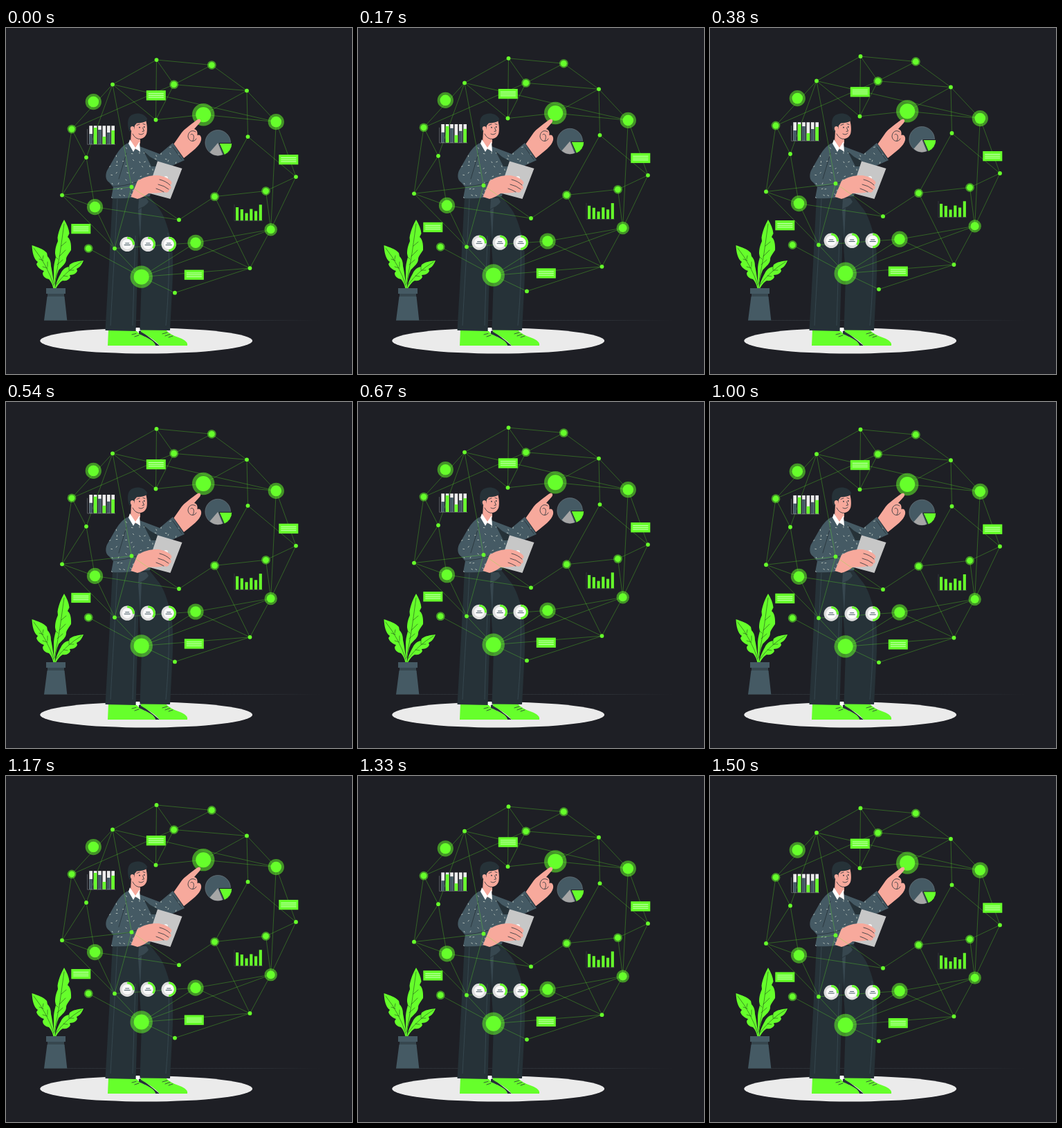
Write an HTML page that moves like this. It is 500 by 500 pixels and loops after 1540 ms.

```html
<!DOCTYPE html>
<html lang="en">
<head>
<meta charset="utf-8">
<title>Data network</title>
<style>
html, body { margin: 0; width: 100%; height: 100%; overflow: hidden; background: #1e1f25; }
svg { display: block; width: 100vw; height: 100vh; }
.g { fill: #66ff2b; }
.slate { fill: #455a64; }
.dark { fill: #263238; }
.skin { fill: #f7a99c; }
.ink { fill: none; stroke: #263238; stroke-width: .8; stroke-linecap: round; stroke-linejoin: round; }
.vein { fill: none; stroke: #1f4a1c; stroke-width: .6; stroke-linecap: round; }
.seam { fill: none; stroke: #41545d; stroke-width: .6; }
.link { fill: none; stroke: #66ff2b; stroke-width: .6; opacity: .5; }
.ring { fill: #66ff2b; opacity: .52; }
.rows { fill: none; stroke: #d9ffca; stroke-width: .9; }
</style>
</head>
<body>
<svg viewBox="0 0 500 500">
  <defs>
    <linearGradient id="fade"><stop stop-color="#30353b"/><stop offset=".75" stop-color="#30353b"/><stop offset="1" stop-color="#1e1f25"/></linearGradient>
    <clipPath id="cut"><use href="#shirt"/></clipPath>
  </defs>

  <rect x="55" y="422" width="400" height=".8" fill="url(#fade)"/>
  <ellipse cx="202.700" cy="452" rx="153.500" ry="18.500" fill="#ebebeb"/>

  <g id="plant">
    <path class="g" d="M84 277C88 284 91 290 91.500 297L89 302C93 305 94.500 312 94 321C91 326 87 330 87 334C87 341 80 345 76 350C73 357 71 366 70.800 376H69.300C69 366 69 358 69 350C69 341 71 336 72 331L71 326C71 318 73 313 75 308L74.500 303C76 293 80 284 84 277Z"/>
    <path class="g" d="M37.500 314C46 317 54 319 59 325L60 330C64 334 65 339 65 344C67 353 69 366 69.700 376H68.300C67 370 65 366 62 363C57 362 53 359 53 354L55 351C49 349 45 345 44 341L46 338C40 334 38 324 37.500 314Z"/>
    <path class="g" d="M112 336C104 337 97 338 92 342L91 345C85 346 81 350 79 355C75 362 72 369 71 376H72.300C75 371 78 367 82 365C87 366 91 364 93 360L92 357C98 357 102 354 103 351L102 348C107 346 110 341 112 336Z"/>
    <path class="vein" d="M84 283Q79 325 70.200 370M40 318Q60 343 69 372M109 338Q86 352 72.500 371M80 315L87 309M77 330L86 321M74 342L82 335M75 334L72 331M53 334L54 329M60 345L60 338M54 336L48 334M60 347L53 345M91 349L91 345M91 350L98 350M83 358L89 359"/>
    <path fill="#37474f" d="M60 383H84V389H60Z"/>
    <path class="slate" d="M58 376H86V384H58ZM59.500 388H84.500L88.300 422.500H55Z"/>
  </g>

  <g id="man">
    <path class="g" d="M148 436H188C190 442 200 446 210 450C215 452 217 455 215.500 459H147Z"/>
    <path class="dark" d="M192 437L196 438L222 459H216C215 451 202 447 192 442Z"/>
    <path class="g" d="M195 436H231C235 442 246 446 254 449C260 452 263 455 262 459H222C216 451 203 444 195 439Z"/>
    <path class="ink" d="M182 443L188 441.500M186 446L192 444M226 442L233 440M230 445L237 442.500M235 447L241 445"/>
    <path fill="#fff" d="M187.500 433H193V438H187.500Z"/>
    <path class="dark" d="M154 243H194L191 320L187.500 438L143.500 437L149 340ZM190 243H207L222 262C229 272 233 286 237 300C242 318 242 345 240 380L237 437L193.500 436.500L196 360L192 300Z"/>
    <path fill="#37474f" d="M191 262C196 259 203 257 206 251L203 246H192ZM191 263L196 260L194 305Z"/>
    <path class="seam" d="M161 247C158 310 154 370 151 430M234 296C237 330 235 385 231 430M187 300L183 430"/>
    <path id="shirt" class="slate" d="M179 165C169 169 165 174 158 185L146 206C143 213 144 220 149 223L155 230L152 246Q167 247 182 245L208 243L216 206L238 200L258 191L241 166L222 182L193 171Z"/>
    <g id="dashes" clip-path="url(#cut)" fill="none" stroke="#cfd8cf" stroke-width=".8"></g>
    <path class="dark" d="M199 178L208 186L222 194L219 200L210 200Z"/>
    <path class="ink" d="M174 181Q167 205 163 218M154 229Q170 229 188 223M241 172L254 190"/>
    <path class="skin" d="M181 148H194L194 166L188 176L180 166Z"/>
    <path fill="#fff" d="M179 161L187 173L193 164L194 179L187 174L184 179L177 167Z"/>
    <path class="skin" d="M182 136L202 133C204 140 204.500 148 203 153C201 158 197 160.500 192 160C188 159 184 154 182 149Z"/>
    <path class="dark" d="M178 149C175 140 175 130 181 126C188 121.500 200 123 204 131C204 135 200 137 189 137.500L186 141L185 147L182 143L181 150Z"/>
    <path class="skin" d="M185 143C181 140 178 144 181 148.500L185 150Z"/>
    <path class="ink" d="M183 153Q187 161 194 160.500M189 140.500L193 139M198 138.500L201 139.500M197.500 144L199.500 149L197 149.500M192 153Q196 155.500 199 152"/>
    <circle cx="193" cy="143.700" r=".9" class="dark"/><circle cx="199.700" cy="143" r=".9" class="dark"/>
    <path fill="#c7c7c7" d="M219 192.500L254.500 203L237.500 247L204 238Z"/>
    <circle cx="231" cy="217" r="3" fill="#f5f5f5"/>
    <path class="skin" d="M180.500 244L190 221C199 215 210 212.500 220 213C228 214 235 217 239 222C240 224 239 226 237 227C240 230 239 233 236 233.500C236 237 232 239 229 237C221 239 213 238 206 239Q198 245 190 247Z"/>
    <path class="ink" d="M222 219Q231 221 237 227M220 226Q229 228 235 233M217 232Q223 234 228 237"/>
  </g>

  <g id="net"></g>

  <path class="skin" d="M242.500 167.500L254 151C258 146 263 143 267 139.500L276 132.700C280 130 283 133 280 137L272 146C276 147 277 150 276.500 155C280 153 283 157 282 162C280 171 269 178 257 188Z"/>
  <path class="ink" d="M274 150C268 146 263 151 263 157C264 164 272 166 275 160M267 154C271 151 273 158 270 163"/>
</svg>
<script>
const $ = id => document.getElementById(id);
const circle = (x, y, r, more) => `<circle cx="${x}" cy="${y}" r="${r}" ${more}/>`;
const rect = (x, y, w, h, more) => `<rect x="${x}" y="${y}" width="${w}" height="${h}" ${more}/>`;
const green = 'class="g"';

// x, y and size class of each node
const nodes = {
  A: [217.5, 46, 0], B: [154, 81.5, 0], C: [348, 90.5, 0], D: [216.5, 132.7, 0],
  E: [349.5, 157, 0], F: [116, 187, 0], G: [81, 241.5, 0], H: [181.5, 229.7, 0],
  I: [250, 277.2, 0], J: [157, 318.5, 0], K: [352.5, 347, 0], L: [244, 382.6, 0], M: [419, 215, 0],
  N: [297.3, 53.5, 1], O: [242.7, 81.6, 1], P: [95, 146, 1], Q: [301.5, 243.6, 1],
  R: [375.5, 235.5, 1], S: [119.2, 318.5, 1],
  T: [126.3, 106.6, 3], U: [390.3, 135.6, 3], V: [128.5, 258.6, 3], W: [274, 310.2, 3], X: [382.7, 291.2, 2],
  Y: [285.2, 125.2, 4], Z: [195.7, 359.6, 4]
};
const sizes = [[2.9, 0], [4.4, 6.4], [6, 9.2], [7.8, 11.6], [11, 16.2]];
const links = 'AB AN AD AO NC NO OC OD BD BP BF BH BU PO YD YC YU CE CU EM UM UX EQ QR RX RM XM ' +
  'QI QK XK XW XZ WZ WK ZK ZL LK VI IH HJ GJ GH GV GF GP PF FV VJ SZ JZ JW';

const at = k => nodes[k].slice(0, 2).join(' ');
const web = `<path class="link" d="${links.split(' ').map(([a, b]) => `M${at(a)}L${at(b)}`).join('')}"/>`;
const dots = Object.values(nodes).map(([x, y, s]) => {
  const [r, halo] = sizes[s];
  return (halo ? circle(x, y, halo, 'class="ring"') : '') + circle(x, y, r, green);
}).join('');

const tag = (x, y) => rect(x, y, 28, 14.3, green) +
  `<path class="rows" d="M${x + 3} ${y + 4.5}h22m-22 2.7h22m-22 2.7h22"/>`;
const tags = tag(202.8, 90.2) + tag(394.3, 183) + tag(94.3, 283) + tag(257.8, 349.5);

const columns = [259, 262, 267.5, 261.5, 264.5, 255.3]
  .map((y, i) => rect(332 + i * 6.75, y, 4.1, 278.3 - y, green)).join('') +
  '<path d="M330 255V278.600H371" fill="none" stroke="#454b50" stroke-width=".6"/>';

const stacks = [153, 144, 147, 157, 151, 148].map((y, i) => {
  const x = 120.3 + i * 6.4;
  return rect(x, 141.2, 4.7, 26.6, 'fill="#ededed"') + rect(x, y, 4.7, 167.8 - y, `class="${i % 2 ? 'g' : 'slate'}"`);
}).join('') + '<path d="M117.500 146V168.200H158" fill="none" stroke="#777d82" stroke-width=".6"/>';

const pie = circle(306.2, 165.8, 18.3, 'class="slate" stroke="#748087" stroke-width=".6"') +
  '<path d="M306.200 166L294.500 179.500A18 18 0 0 0 313 183Z" fill="#a6a6a6"/>' +
  '<path class="g" d="M308 166.500H326.800A18.500 18.500 0 0 1 315.500 183.500Z" stroke="#1e1f25" stroke-width="1"/>';

const donut = (x, share) => circle(x, 312.3, 10.7, 'fill="#dedede"') +
  circle(x, 312.3, 9.2, `fill="none" stroke="#66ff2b" stroke-width="3" pathLength="100" stroke-dasharray="${share} 100" transform="rotate(-90 ${x} 312.3)"`) +
  circle(x, 312.3, 7.3, 'fill="#fafafa"') +
  `<path d="M${x - 3} 311h6m-7.500 2.500h9" stroke="#455a64" stroke-width="1"/>`;

$('net').innerHTML = web + stacks + pie + columns + tags + dots + donut(175.2, 27) + donut(205.2, 36) + donut(235.2, 50);

// scattered fabric pattern
let seed = 7;
const rnd = () => (seed = seed * 16807 % 2147483647) / 2147483647;
let dashes = '';
for (let y = 168; y < 246; y += 10)
  for (let x = 146; x < 258; x += 11) {
    const a = rnd() * Math.PI;
    dashes += `M${x + rnd() * 7} ${y + rnd() * 6}l${2.6 * Math.cos(a)} ${2.6 * Math.sin(a)}`;
  }
$('dashes').innerHTML = `<path d="${dashes}"/>`;

// linear bob, stepped at 24 frames per second
const LOOP = 1540, TICK = 1000 / 24, TOP = 735, RATE = 10.3 / 770;
const start = performance.now();
function draw() {
  const t = (performance.now() - start) % LOOP;
  const step = Math.min(36, Math.floor((t + 5) / TICK)) * TICK;
  const gap = Math.abs(step - TOP);
  const y = Math.min(gap, LOOP - gap) * RATE - 9.8;
  $('net').setAttribute('transform', `translate(0 ${y.toFixed(2)})`);
  requestAnimationFrame(draw);
}
draw();
</script>
</body>
</html>
```
